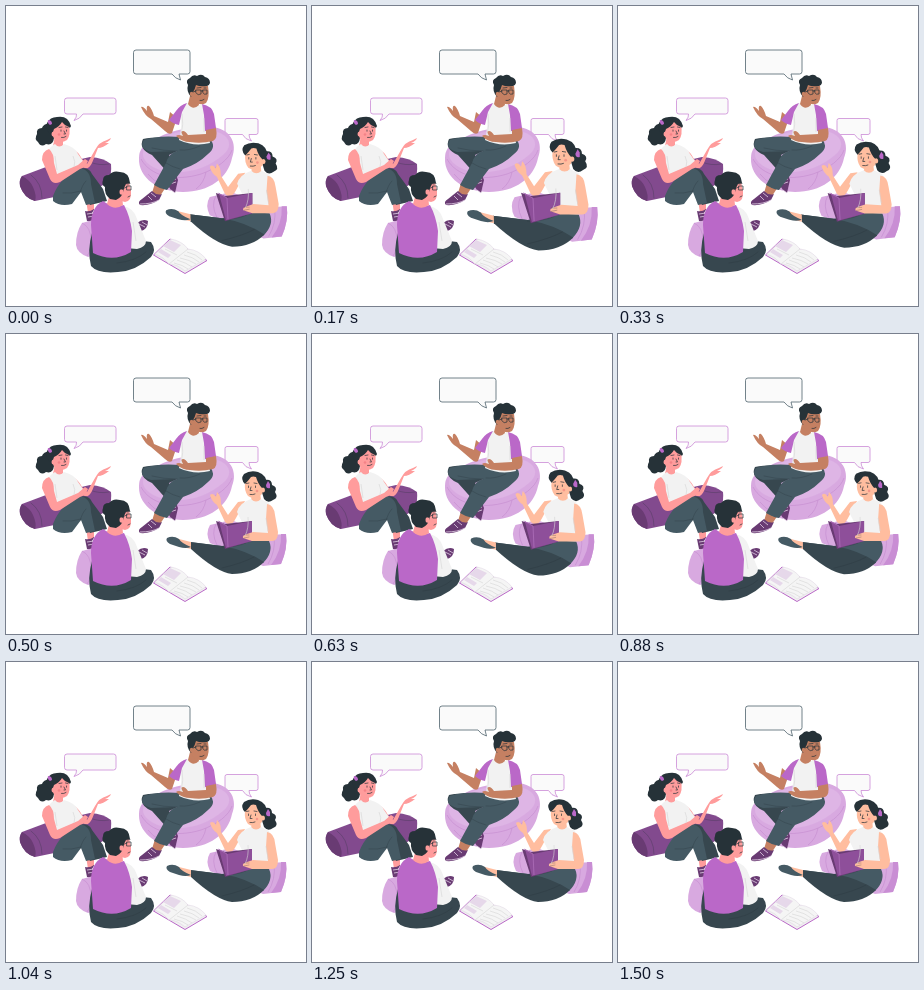
Animation of 300 by 300 pixels, one loop 1.54 s. Source, as an HTML page:

```html
<!DOCTYPE html>
<html lang="en">
<head>
<meta charset="utf-8">
<title>Group discussion</title>
<style>
  html, body { margin: 0; height: 100%; overflow: hidden; background: #fff; }
  svg { display: block; width: 100vw; height: 100vh; }
  .dark { fill: #263238; }
  .trousers { fill: #455a64; }
  .seat { fill: #37474f; }
  .white { fill: #f2f2f2; }
  .purple { fill: #ba68c8; }
  .violet { fill: #8e4f9a; }
  .plum { fill: #824a8e; }
  .wine { fill: #693b73; }
  .orchid { fill: #c98ed4; }
  .lilac { fill: #d8a9e0; }
  .mist { fill: #deb5e5; }
  .brown { fill: #c58062; }
  .pink { fill: #ff9c9c; }
  .peach { fill: #ffbd9f; }
  .line { fill: none; stroke: #263238; stroke-width: .7; stroke-linecap: round; stroke-linejoin: round; }
  .fold { fill: none; stroke: #263238; stroke-opacity: .45; stroke-width: .6; stroke-linecap: round; }
  .seam { fill: none; stroke: #c48ccf; stroke-width: .6; }
  .soft { fill: none; stroke: #d5d5d5; stroke-width: .6; }
  .lace { fill: none; stroke: #f3e4f5; stroke-width: .7; }
  .blush { fill: #e35d68; opacity: .4; }
  .bubble { fill: #fafafa; stroke-width: .75; stroke-linejoin: round; }
</style>
</head>
<body>
<svg viewBox="0 0 300 300">
  <g class="bubble">
    <path stroke="#455a64" d="M130 44H181.500Q184 44 184 46.500V65.500Q184 68 181.500 68H173L174.500 74Q169 72.500 166 68H130Q127.500 68 127.500 65.500V46.500Q127.500 44 130 44Z"/>
    <path stroke="#c985d5" d="M61 92H107.500Q110 92 110 94.500V105.500Q110 108 107.500 108H77Q74 113 68 114.500Q71 111 70.500 108H61Q58.500 108 58.500 105.500V94.500Q58.500 92 61 92Z"/>
    <path stroke="#c985d5" d="M221 112.500H250Q252 112.500 252 114.500V126.500Q252 128.500 250 128.500H243Q243 132 245.500 135Q239 133.500 236.500 128.500H221Q219 128.500 219 126.500V114.500Q219 112.500 221 112.500Z"/>
  </g>

  <!-- man on the beanbag -->
  <g>
    <path class="lilac" d="M136 142C148 130 178 119 205 121C224 122 232 137 226 152C222 172 203 186 177 186C153 186 132 172 133 152Q133 146 136 142Z"/>
    <path class="mist" d="M140 141C157 126 186 122 207 125C224 128 228 140 217 149C203 161 184 168 163 166C143 163 131 151 140 141Z"/>
    <path class="seam" d="M135 153C144 170 169 176 195 168C212 162 223 153 226 144M142 168Q151 180 171 183M200 166Q198 177 190 183"/>
    <path class="brown" d="M162 163L171 162L171 172L164 173Z"/>
    <path class="brown" d="M149 177L160 181L154 190L146 187Z"/>
    <path class="wine" d="M162 171Q166 173 170 169L172 174L169 187L165 184L161 178Z"/>
    <path class="wine" d="M146 185Q151 190 156 188L153 194Q144 200 134 199Q131 196 136 193Z"/>
    <path class="lace" d="M163 175L170 173M164 178L170 176M142 190L146 194M145 187L150 191M134 198Q146 198 153 194M165 184L169 187"/>
    <path class="seat" d="M137 133Q149 130 174 132L180 141L163 149L172 164L163 168L146 149Q132 143 137 133Z"/>
    <path class="trousers" d="M175 131L204 133Q211 141 202 148Q192 158 177 163L161 184Q154 183 148 179L160 157Q163 147 171 145L145 146Q132 142 138 134Q152 129 175 131Z"/>
    <path class="fold" d="M174 144Q183 145 194 140M160 157Q166 161 174 163M146 142Q157 145 171 145"/>
    <path class="brown" d="M171 112L166 127Q163 129 159 125L145 113Q139 110 135 101Q137 100 141 105Q140 99 143 100Q146 103 148 110L162 116L164 106Z"/>
    <path class="white" d="M181 97L196 99Q200 104 199 115L204 137Q188 141 173 134Q177 120 173 106Q175 98 181 97Z"/>
    <path class="purple" d="M181 97Q174 99 170 105L163 114Q167 118 173 119L176 106Z"/>
    <path class="purple" d="M196 98Q206 100 208 108L210 122Q205 126 199 125L198 109Z"/>
    <path class="brown" d="M200 124L210 122Q212 133 207 135Q195 138 184 136Q176 136 170 130Q172 128 177 130L175 126Q178 123 182 129L200 128Z"/>
    <path class="brown" d="M184 90L192 93L193 99Q187 105 182 98Z"/>
    <path class="brown" d="M185 80Q196 74 202 80Q204 92 200 97Q195 100 188 96Q183 90 184 84Z"/>
    <path class="dark" d="M185 91Q180 85 182 79Q179 74 184 72Q187 68 191 70Q196 67 199 71Q204 72 204 77Q203 80 201 80Q194 81 190 79Q189 83 187 86Z"/>
    <circle class="brown" cx="186" cy="88" r="2.300"/>
    <path class="line" d="M187 86L190 85M190 84H195V88Q192 90 190 87ZM197 84H201V88Q198 89 197 87ZM195 85H197M191 82L195 81.500M198 82L200 82M194 94.500Q196 95 198 93.500"/>
    <path class="soft" d="M176 108Q178 118 175 129M198 112V126"/>
  </g>

  <!-- woman on the left -->
  <g>
    <path class="plum" d="M16 170L40 161L84 151Q98 152 105 158Q106 168 102 176L92 182L29 195Q18 192 14 180Q13 174 16 170Z"/>
    <path class="wine" d="M16 170Q24 174 27 181Q31 190 29 195Q18 192 14 180Q13 174 16 170Z"/>
    <path class="fold" d="M25 169Q36 177 36 192M84 156Q93 160 103 158"/>
    <path class="pink" d="M80 194L88 194L88 206L82 207Z"/>
    <path class="wine" d="M79 205Q84 206 88 203L90 214Q86 217 81 215Z"/>
    <path class="lace" d="M81 208L88 207M82 211L88 210"/>
    <path class="dark" d="M44 117Q37 118 36 122Q30 122 31 128Q28 133 32 136Q35 142 40 138Q47 140 48 132L49 121Z"/>
    <path class="pink" d="M49 130L57 132V140Q53 145 47 140Z"/>
    <path class="pink" d="M47 117Q58 111 63 118Q65 129 61 134Q55 138 49 134Q45 128 46 121Z"/>
    <path class="dark" d="M46 129Q39 126 41 117Q44 111 51 111Q62 109 65 120Q64 123 63 121Q58 119 56 116Q53 121 48 123Z"/>
    <path class="purple" d="M42 114Q46 114 46 118L44 119Q41 117 42 114Z"/>
    <ellipse class="pink" cx="47.500" cy="128" rx="2" ry="2.500"/>
    <path class="line" d="M53 121.500L56 121M59.500 121L62 121.500M55 124V125.200M60.500 124V125.200M58 125L59.500 128L58 128M55.500 131.500Q58 132 60 130.500"/>
    <circle class="blush" cx="53" cy="128.500" r="1.300"/>
    <path class="pink" d="M66 143Q72 145 76 153L81 158L89 144Q93 136 101 134L105 132Q104 135 99 137L103 137Q97 142 92 142L86 157Q82 165 77 161L67 155Z"/>
    <path class="white" d="M49 138Q53 143 58 138Q69 141 72 148L79 158L68 163Q57 170 49 168Q46 155 41 148Q43 141 49 138Z"/>
    <path class="seat" d="M72 163Q83 160 86 168L97 183L101 195L84 199L74 181Z"/>
    <path class="trousers" d="M47 190Q54 171 74 162Q85 164 85 178L89 197L80 199L75 186L66 198Q54 201 47 195Z"/>
    <path class="pink" d="M43 143Q48 147 48 157L51 168L72 159L79 153L82 155L79 161L74 163L54 176Q47 179 44 173L36 154Q36 145 43 143Z"/>
    <path class="fold" d="M74 187Q76 179 80 175M57 187Q65 188 75 185"/>
    <path class="soft" d="M67 150Q70 156 68 161M49 150L51 164"/>
  </g>

  <!-- woman on the right -->
  <g id="reader">
    <path class="lilac" d="M204 191L225 186L264 201L280 200Q282 214 275 230L257 232L204 209Q199 199 204 191Z"/>
    <path class="orchid" d="M275 200H280Q282 214 275 230L265 231Q276 217 275 200Z"/>
    <path class="seam" d="M210 190Q205 199 211 211M268 202Q270 217 262 230"/>
    <path class="dark" d="M259 146Q266 145 266 151Q272 153 269 158Q273 164 267 166Q262 170 258 165L254 152Z"/>
    <path class="peach" d="M246 158L254 157L255 167Q250 173 245 167Z"/>
    <path class="peach" d="M241 144Q247 139 254 143Q259 152 256 160Q249 167 242 162Q238 157 239 149Z"/>
    <path class="dark" d="M239 150Q234 145 238 140Q244 136 252 138Q261 141 261 151Q262 157 258 160L256 154Q252 150 250 143Q247 142 245 143Q242 147 239 150Z"/>
    <path class="purple" d="M262 147L264 150L264 154Q260 155 260 151Z"/>
    <ellipse class="peach" cx="257" cy="156" rx="2" ry="2.500"/>
    <path class="line" d="M240.500 149.500L243 149M248 149L251 149.500M242.500 152V153.500M249.500 152V153.500M245 153L244 156.500L246 156.500M244 160.500Q247 161 249 160"/>
    <circle class="blush" cx="251" cy="157" r="1.300"/>
    <path class="peach" d="M239 167L230 184Q225 194 219 188L211 171Q206 168 204 161Q207 158 210 163L211 158Q215 161 215 170L222 181L232 168Z"/>
    <path class="white" d="M245 165Q250 170 255 165L263 169Q267 180 263 190L263 207Q247 211 236 205L237 190L231 178Q233 169 245 165Z"/>
    <path class="trousers" d="M184 208L216 212L244 206L263 207Q268 218 257 229L216 235Z"/>
    <path class="seat" d="M184 208L216 212Q240 216 258 228Q246 240 226 240Q210 238 185 215Z"/>
    <path class="fold" d="M216 213Q231 213 240 209M216 234Q237 229 248 223"/>
    <path class="peach" d="M169 204L185 208V215L172 212Z"/>
    <path class="trousers" d="M161 204Q167 201 173 205Q175 209 185 213Q180 215 173 213L164 210Q159 207 161 204Z"/>
    <path class="wine" d="M210 187L219 190L246 187V207L219 215Z"/>
    <path class="violet" d="M213 187L221 192L246 187V207L220 214Z"/>
    <path d="M212 187L221 192L222 213" fill="none" stroke="#b273be" stroke-width=".7"/>
    <path class="peach" d="M261 170Q268 171 269 181L272 198Q272 207 266 207L246 207L237 204Q236 201 241 200L247 198L262 199L260 185Z"/>
    <path class="fold" d="M238 201L243 201M238 204L243 203"/>
    <path class="soft" d="M242 183Q243 194 239 202M260 184L262 197"/>
  </g>

  <!-- open book on the floor -->
  <g>
    <path d="M147.500 249L164 233L201 254.500L179 267.500Z" fill="#f0f0f0" stroke="#ba68c8" stroke-width="1" stroke-linejoin="round"/>
    <path d="M149 248L165 233Q176 235 182 243Q193 244 200 253L179 265Q171 258 163 258Q158 251 149 248Z" fill="#f5f5f5" stroke="#ddd2e0" stroke-width=".5"/>
    <path d="M157 240L164 234L175 239L168 246ZM152 246L155 243L165 249L162 252Z" fill="#e6d8ea"/>
    <path class="soft" d="M182 243L163 258M159 243L171 249M181 246Q190 248 196 254M178 249Q187 251 193 256M174 252Q184 254 190 258M171 254Q181 257 186 261M168 257Q177 259 182 263"/>
  </g>

  <!-- man seen from behind -->
  <g>
    <path class="lilac" d="M76 217L91 213L102 245L82 251Q71 247 70 239Q70 226 76 217Z"/>
    <path class="seam" d="M76 217Q85 221 85 235Q85 245 81 250"/>
    <path class="wine" d="M131 217Q137 212 142 215Q142 223 135 225L130 226Z"/>
    <path class="lace" d="M133 218L139 221M136 216L141 219"/>
    <path class="seat" d="M86 227Q81 244 85 260Q92 268 112 266Q130 265 145 251Q151 244 145 236L129 234Z"/>
    <path class="white" d="M117 200Q128 202 131 213L140 235Q140 241 131 243L120 242ZM92 197L86 207L90 214Z"/>
    <path class="purple" d="M97 195Q106 202 118 199Q124 210 126 225L125 246Q107 257 87 247L85 219Q85 201 97 195Z"/>
    <path class="pink" d="M104 187L116 190L117 199Q109 205 101 198Z"/>
    <path class="pink" d="M112 176L123 176L125 185Q126 195 119 196Q113 195 110 189Z"/>
    <path class="dark" d="M104 193Q98 188 99 181Q95 179 97 174Q97 169 103 169Q107 164 114 166Q123 166 124 177L120 178L118 182Q117 191 110 194Z"/>
    <ellipse class="pink" cx="115.500" cy="186" rx="2" ry="2.800"/>
    <path class="line" d="M116 183L121 181M121 180H125V184H121ZM121 178L124 177.500M122 191L124 190"/>
    <path class="fold" d="M111 257Q130 255 140 246"/>
    <path class="soft" d="M127 216L130 235"/>
  </g>
</svg>
<script>
  const FPS = 24, FRAMES = 37, LOOP = 1540;
  const LEAD = 20; // ms into the beat when the loop starts
  const reader = document.getElementById('reader');
  // Double heartbeat: [time in ms, scale], joined by straight lines.
  const beat = [[0, 1], [150, 1.1], [450, 1], [600, 1], [750, 1.1], [900, 1], [2000, 1]];

  function scaleAt(t) {
    const i = beat.findIndex(key => key[0] > t);
    const [t0, s0] = beat[i - 1], [t1, s1] = beat[i];
    return s0 + (s1 - s0) * (t - t0) / (t1 - t0);
  }

  const start = performance.now();
  function draw() {
    const elapsed = (performance.now() - start) % LOOP;
    // The motion advances in film steps, each starting on a rounded 10 ms tick.
    const step = Math.floor((elapsed + 5) * FPS / 1000) % FRAMES;
    const scale = scaleAt(step * 1000 / FPS + LEAD);
    reader.setAttribute('transform', `translate(221 189) scale(${scale}) translate(-221 -189)`);
    requestAnimationFrame(draw);
  }
  draw();
</script>
</body>
</html>
```
